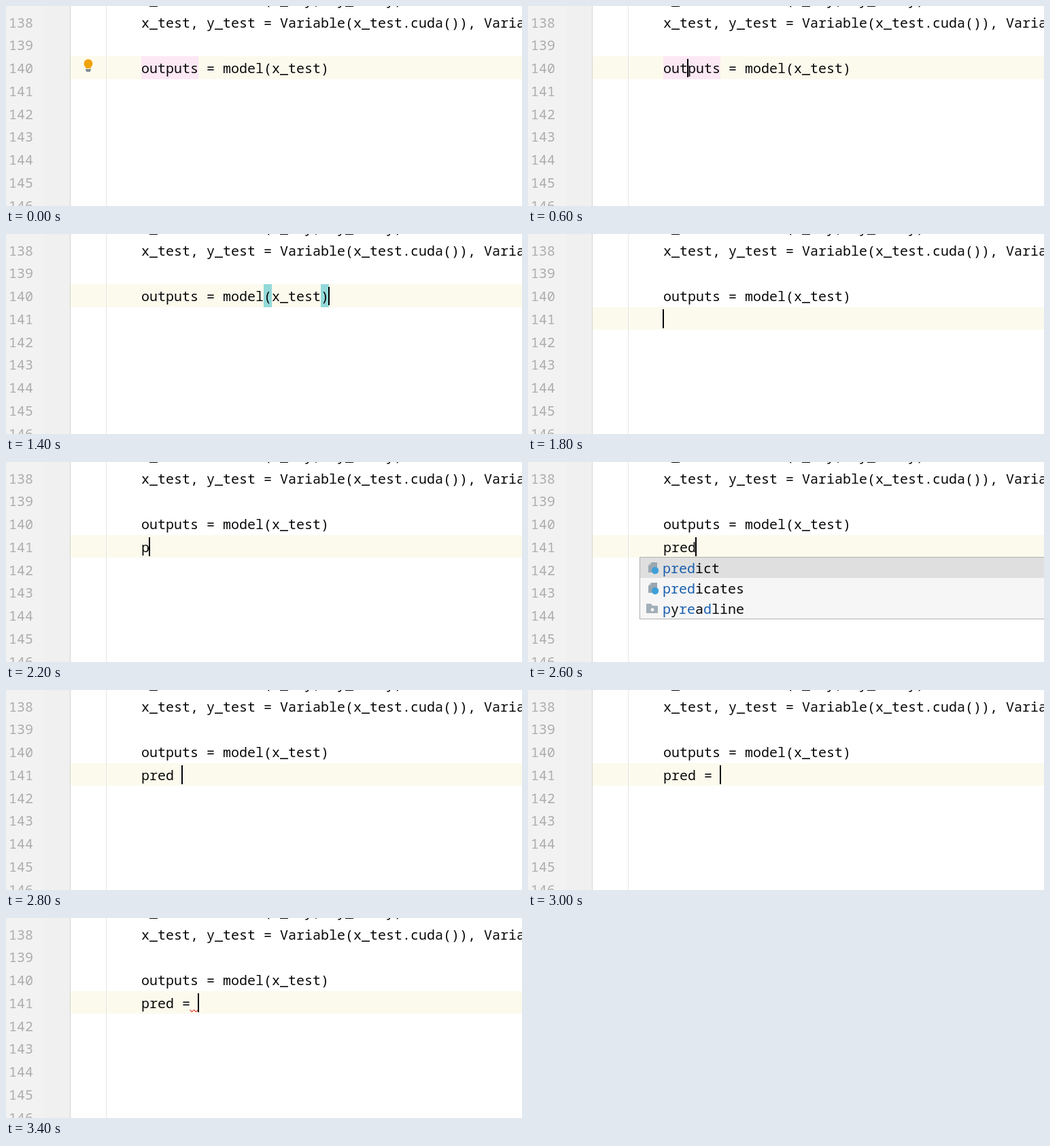
Animation of 759x295 px, one loop 4.4 s. Source, as an HTML page:

```html
<!DOCTYPE html>
<html lang="en">
<head>
<meta charset="utf-8">
<title>Code editor</title>
<style>
  html, body { margin: 0; width: 100%; height: 100%; overflow: hidden; background: #fff; }
  svg { display: block; width: 759px; height: 295px; }
  text { font: 20px "Noto Sans Mono", "DejaVu Sans Mono", monospace; white-space: pre; fill: #080808; }
  .num { fill: #adadad; }
  .hit { fill: #1a5fae; }
  .box { shape-rendering: crispEdges; }
</style>
</head>
<body>
<svg id="stage" viewBox="0 0 759 295"></svg>
<script>
const LOOP = 4400;
const CELL = 12;      // width of one character
const LEFT = 199;     // first code column
const PITCH = 33.75;  // line height
const ROW = 30;       // popup row height

const stage = document.getElementById('stage');

function add(tag, attrs, parent = stage, content = '') {
  const el = document.createElementNS('http://www.w3.org/2000/svg', tag);
  for (const key in attrs) el.setAttribute(key, attrs[key]);
  el.textContent = content;
  parent.appendChild(el);
  return el;
}
const rect = (x, y, width, height, fill, parent) =>
  add('rect', { x, y, width, height, fill, class: 'box' }, parent);
const write = (x, y, content, parent, cls = '') =>
  add('text', { x, y, class: cls }, parent, content);
const show = (el, on) => el.setAttribute('visibility', on ? 'visible' : 'hidden');
const baseline = line => 99 + (line - 140) * PITCH;

// Backgrounds
rect(0, 0, 759, 295, '#ffffff');
rect(0, 0, 94, 295, '#f0f0f0');
rect(0, 0, 56, 295, '#f2f2f2');
const band = rect(95, 74, 664, 34, '#fcfaed');
rect(94, 0, 1, 295, '#d3d3d3');
rect(147, 0, 1, 295, '#e6e6e6');

const usage = rect(LEFT, 74, 7 * CELL, 34, '#fce8f4');
const brackets = add('g', {});
rect(379, 74, CELL, 34, '#93d9d9', brackets);
rect(463, 74, CELL, 34, '#93d9d9', brackets);

// Code
for (let n = 138; n <= 146; n++) write(4, baseline(n), n, stage, 'num');
write(LEFT, baseline(137), 'x_test = loader(x_any, my_array)');
write(LEFT, baseline(138), 'x_test, y_test = Variable(x_test.cuda()), Variable(');
write(LEFT, baseline(140), 'outputs = model(x_test)');
const typed = write(LEFT, baseline(141), '');

const squiggle = add('path', {
  d: 'M270.5 135.5l3 3l3-3l3 3l2.5-2.5', fill: 'none', stroke: '#e0443e', 'stroke-width': 1.1
});
const caret = rect(0, 0, 2, 28, '#000000');

// Light bulb
const bulb = add('g', {});
add('path', {
  d: 'M121 78.5a6.4 6.4 0 0 1 6.4 6.4c0 2.6-1.4 4-2.6 5.6v1.5h-7.6v-1.5c-1.2-1.6-2.6-3-2.6-5.6a6.4 6.4 0 0 1 6.4-6.4z',
  fill: '#f0a30a'
}, bulb);
rect(117, 93, 8, 1.5, '#7f8b91', bulb);
rect(118, 95, 6, 1.5, '#7f8b91', bulb);

// Completion popups; matched letters are in brackets
function fileIcon(y, parent) {
  add('path', { d: `M182 ${y - 9}h8v15h-13v-10z`, fill: '#9aa7b0' }, parent);
  add('path', { d: `M177 ${y - 5}l4-4v4z`, fill: '#b9c2c8' }, parent);
  add('circle', { cx: 187, cy: y + 3, r: 5.2, fill: '#3f9fd8' }, parent);
}
function folderIcon(y, parent) {
  add('path', { d: `M174 ${y - 8}h7l2 3h8v11h-17z`, fill: '#a3afb7' }, parent);
  add('circle', { cx: 183, cy: y + 1, r: 2.4, fill: '#f3f5f6' }, parent);
}
function popup(items, height) {
  const group = add('g', {});
  rect(164, 140, 595, height, '#b0b0b0', group);
  rect(165, 141, 594, height - 2, '#f6f6f6', group);
  rect(165, 141, 594, ROW, '#dfdfdf', group);
  items.forEach(([icon, label], i) => {
    const mid = 157 + i * ROW;
    icon(mid, group);
    const line = write(198, mid + 7, '', group);
    label.split(/[\[\]]/).forEach((part, k) =>
      add('tspan', { class: k % 2 ? 'hit' : '' }, line, part));
  });
  return group;
}
const wide = popup([
  [fileIcon, '[pr]ofile'],
  [folderIcon, '[pr]ompt_toolkit'],
  [folderIcon, '[pr]ometheus_client'],
  [folderIcon, '[p]kg_[r]esources'],
  [fileIcon, 'p[pr]int']
], 160);
const narrow = popup([
  [fileIcon, '[pred]ict'],
  [fileIcon, '[pred]icates'],
  [folderIcon, '[p]y[read]line'.replace('[read]', '[re]a[d]')]
], 92);

// Each step: start time, line, caret column (-1 hides it), typed text
const steps = [
  [0, 140, -1, ''],
  [600, 140, 3, ''],
  [1400, 140, 23, ''],
  [1800, 141, 0, ''],
  [2200, 141, 1, 'p'],
  [2400, 141, 3, 'pre'],
  [2600, 141, 4, 'pred'],
  [2800, 141, 5, 'pred '],
  [3000, 141, 7, 'pred = ']
];

function draw(t) {
  const [, line, col, content] = steps.filter(s => s[0] <= t).pop();
  const within = (from, to) => t >= from && t < to;
  const lower = line === 141;
  band.setAttribute('y', lower ? 108 : 74);
  band.setAttribute('height', lower ? 33 : 34);
  typed.textContent = content;
  caret.setAttribute('x', LEFT - 1 + col * CELL);
  caret.setAttribute('y', lower ? 111 : 78);
  caret.setAttribute('height', lower ? 28 : 27);
  show(caret, col >= 0);
  show(bulb, t < 600);
  show(usage, t < 1400);
  show(brackets, within(1400, 1800));
  show(wide, within(2400, 2600));
  show(narrow, within(2600, 2800));
  show(squiggle, t >= 3400);
}

const start = performance.now();
function tick() {
  draw((performance.now() - start) % LOOP);
  requestAnimationFrame(tick);
}
draw(0);
requestAnimationFrame(tick);
</script>
</body>
</html>
```
